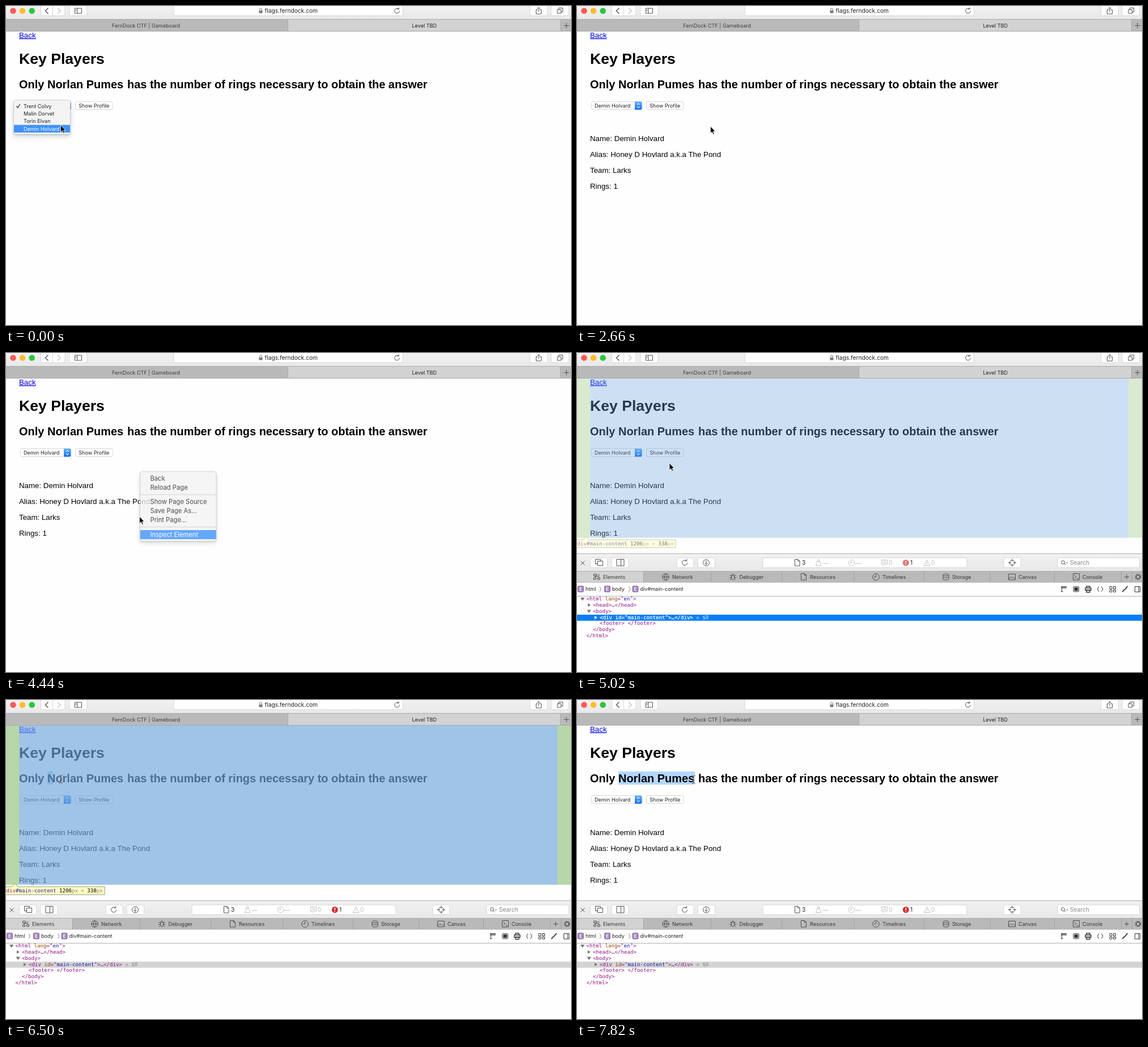
Recreate the animation shown at these times as an HTML page. Size 997 by 562 pixels, loop 8000 ms.

```html
<!DOCTYPE html>
<html lang="en">
<head>
<meta charset="utf-8">
<title>Key Players</title>
<style>
html, body { margin: 0; width: 100%; height: 100%; overflow: hidden; background: #fff; }
svg { display: block; }
text { white-space: pre; }
.ui { font: 9.1px Inter, "Open Sans", sans-serif; fill: #222; }
.big { font-size: 11.2px; }
.url { font-size: 10.2px; }
.mid { text-anchor: middle; }
.page { font: 13.3px "Liberation Sans", Arial, sans-serif; }
.h1 { font-size: 26.6px; font-weight: bold; }
.h2 { font-size: 19.95px; font-weight: bold; }
.link { fill: #00e; text-decoration: underline; }
.code { font: 9.13px "DejaVu Sans Mono", monospace; fill: #8f128a; }
.attr { fill: #994500; }
.val { fill: #1a1aa6; }
.dim { fill: #888; }
.btn { fill: #fff; stroke: #cfcfcf; stroke-width: .8; }
.ic { fill: none; stroke: #505050; stroke-width: 1; }
.pale { stroke: #c2c2c2; }
.faint { fill: #bdbdbd; }
.shadow { filter: drop-shadow(0 1px 1.5px rgba(0,0,0,.16)) drop-shadow(0 4px 4px rgba(0,0,0,.13)); }
.hit { fill: #3f92fc; visibility: hidden; }
.on .hit { visibility: visible; }
.on text { fill: #fff; }
#row rect { fill: #d4d4d4; }
#row.focus rect { fill: #087ef8; }
#row.focus text, #row.focus tspan { fill: #fff; stroke: #fff; stroke-width: .25; }
#row.focus .dim { fill: #d5e8ff; stroke: none; }
#row.focus path { fill: #fff; }
</style>
</head>
<body>
<svg width="997" height="562" viewBox="0 0 997 562">
<defs>
  <linearGradient id="bar" x2="0" y2="1"><stop stop-color="#f2f1f2"/><stop offset="1" stop-color="#e9e8e9"/></linearGradient>
  <linearGradient id="cap" x2="0" y2="1"><stop stop-color="#6ab2fa"/><stop offset="1" stop-color="#0f6dfb"/></linearGradient>
</defs>
<rect width="997" height="562" fill="#fefefe"/>

<g class="page">
  <text class="link" x="23" y="55.9">Back</text>
  <text class="h1" x="23" y="101.5">Key Players</text>
  <rect id="sel" x="73" y="126" height="23" width="0" fill="#b3d7fe"/>
  <g class="h2">
    <text x="23" y="144.6">Only</text>
    <text x="73" y="144.6">Norlan Pumes</text>
    <text x="214" y="144.6">has the number of rings necessary to obtain the answer</text>
  </g>
  <g id="profile">
    <text x="23" y="237.5">Name: Demin Holvard</text>
    <text x="23" y="265.7">Alias: Honey D Hovlard a.k.a The Pond</text>
    <text x="23" y="293.9">Team: Larks</text>
    <text x="23" y="322.1">Rings: 1</text>
  </g>
</g>

<g class="ui">
  <rect class="btn" x="25.5" y="168.5" width="89" height="14" rx="2.5"/>
  <path d="M102 168.3h10a2.5 2.5 0 0 1 2.5 2.5v9.4a2.5 2.5 0 0 1-2.5 2.5h-10z" fill="url(#cap)"/>
  <path d="M106 174l2.3-2.5 2.3 2.5M106 177l2.3 2.5 2.3-2.5" fill="none" stroke="#fff" stroke-width="1.1"/>
  <text x="31" y="178.8">Demin Holvard</text>
  <rect class="btn" x="122.5" y="168.5" width="65.5" height="14" rx="2.5"/>
  <text class="mid" x="155.3" y="178.8">Show Profile</text>
</g>

<g id="overlay">
  <rect x="23" y="45" width="950" height="280.5" fill="rgba(111,168,220,.66)"/>
  <path d="M0 45h23v280.5H0zM973 45h24v280.5h-24z" fill="rgba(147,196,125,.66)"/>
  <path d="M-1 329H10l6-5.5 6 5.5H174V343H-1z" fill="#ffffc2" stroke="#8c8c7c" stroke-width=".9"/>
  <text class="code" x=".5" y="339.3">div<tspan class="val">#main-content</tspan> <tspan fill="#000">1206</tspan><tspan class="dim">px × </tspan><tspan fill="#000">338</tspan><tspan class="dim">px</tspan></text>
</g>

<g id="chrome">
  <rect width="997" height="24" fill="url(#bar)"/>
  <rect y="23" width="997" height="21.5" fill="#bab9ba"/>
  <rect x="498" y="23.5" width="480.5" height="21" fill="#d3d2d3"/>
  <path d="M0 23.5H997M0 44.5H997M497.5 24v20M978.5 24v20" stroke="#a9a9a9" fill="none"/>
  <circle cx="12.5" cy="8.5" r="5.3" fill="#fc5b57"/>
  <circle cx="29" cy="8.5" r="5.3" fill="#fdbd2e"/>
  <circle cx="45.7" cy="8.5" r="5.3" fill="#29c740"/>
  <g class="btn">
    <rect x="61.5" y="-4" width="42.5" height="21" rx="3"/>
    <path d="M82.5 0v17"/>
    <rect x="112" y="-4" width="31" height="21" rx="3"/>
    <rect x="296" y="-4" width="404.5" height="21" rx="3"/>
    <rect x="924.5" y="-4" width="31" height="21" rx="3"/>
    <rect x="962" y="-4" width="31" height="21" rx="3"/>
  </g>
  <rect id="progress" x="296" y="16" height="2" width="0" fill="#2a8bf6"/>
  <g class="ic">
    <path d="M74.5 3.5l-5 5 5 5" stroke-width="1.4"/>
    <path class="pale" d="M91 3.5l5 5-5 5" stroke-width="1.4"/>
    <path d="M121.5 4h12v9h-12zM126 4v9M123 6.5h1.5M123 8.5h1.5"/>
    <path d="M447.5 8v-2a2 2 0 0 1 4 0v2" stroke="#777"/>
    <rect x="446.5" y="8" width="6" height="4.5" fill="#777" stroke="none"/>
    <path id="reload" d="M694.3 8.5a4.3 4.3 0 1 1-1.6-3.3M693.2 2.5v3h-3"/>
    <path id="stop" d="M686.5 5l7 7M693.5 5l-7 7"/>
    <path id="share" d="M938 6.5h-2.5v7.5h9v-7.5H942M940 10.5V2.5M937.5 5L940 2.5l2.5 2.5"/>
    <path d="M973 6.5h6.5v6.5H973zM975.5 6.5v-3h7v7h-3"/>
    <path d="M984.5 34.5h9M989 30v9"/>
  </g>
  <text class="ui url" x="456.5" y="12.3">flags.ferndock.com</text>
  <text class="ui mid" x="247" y="37.5" fill-opacity=".8">FernDock CTF | Gameboard</text>
  <text class="ui mid" x="738.3" y="37.5">Level TBD</text>
</g>

<g id="dev">
  <rect y="353" width="997" height="209" fill="#fefefe"/>
  <rect y="353" width="997" height="31" fill="url(#bar)"/>
  <rect y="384" width="997" height="20" fill="#bab9ba"/>
  <rect y="384.5" width="117" height="19.5" fill="#d3d2d3"/>
  <path d="M0 353.5H997M0 384.5H997M0 404H997M0 428.5H997" stroke="#b0b0b0"/>
  <path d="M117.5 385v19M236.5 385v19M361.5 385v19M489 385v19M612.5 385v19M729 385v19M842.5 385v19M960.5 385v19M979.5 385v19" stroke="#a2a2a2"/>
  <g class="btn">
    <rect x="23.5" y="361" width="30" height="17" rx="2.5"/>
    <rect x="61" y="361" width="30" height="17" rx="2.5"/>
    <rect x="176" y="361" width="30" height="17" rx="2.5"/>
    <rect x="213" y="361" width="30.5" height="17" rx="2.5"/>
    <rect x="328" y="361" width="360" height="17" rx="2.5"/>
    <rect x="753" y="361" width="30" height="17" rx="2.5"/>
    <rect x="848" y="361" width="145" height="17" rx="2.5"/>
  </g>
  <g class="ic">
    <path d="M6.5 366.5l7 7M13.5 366.5l-7 7"/>
    <path d="M36 371.5h-3.500v-8h9v3M36.500 366.500h9v8h-9z"/>
    <path d="M70 363.5h13v11.5H70zM77.5 363.5v11.5"/>
    <path d="M194.5 369.5a4.5 4.5 0 1 1-1.7-3.5M193.8 363v3.3h-3.3"/>
    <circle cx="228" cy="369.5" r="5.5"/><path d="M228 366v6.5M225.5 370l2.5 2.5 2.5-2.5"/>
    <path d="M384.5 363.5h5.5l3 3v8.5h-8.5zM390 363.5v3h3"/>
    <g class="pale">
      <path d="M423.5 367.5h5l2 7h-9z"/><circle cx="426" cy="365.5" r="1.8"/>
      <circle cx="484.5" cy="369.5" r="5.3"/><path d="M484.5 366v3.5h-3M433.5 370.5h10M491 370.5h10"/>
      <path d="M537.5 364.5h10v7.5h-5l-2.5 2.5v-2.5h-2.5zM539.5 367h6M539.5 369.5h6"/>
      <path d="M617.5 364.5l5.5 10H612zM617.5 368v3M617.5 372v1.2"/>
    </g>
    <circle cx="768" cy="369.5" r="4.5"/><path d="M768 362.5v5M768 371.5v5M761 369.5h5M770 369.5h5"/>
    <circle cx="857.5" cy="368.8" r="3"/><path d="M859.8 371l2.5 2.5M863 369l1.5 1.5 1.5-1.5"/>
  </g>
  <g id="error">
    <circle cx="580.3" cy="369.5" r="5.5" fill="#d03434"/>
    <path d="M580.3 366v4M580.3 371.5v1.5" stroke="#fff" stroke-width="1.4"/>
  </g>
  <g class="ui url">
    <text x="397" y="373.2">3</text><text x="588" y="373.2">1</text>
    <text class="faint" x="550" y="373.2">0</text><text class="faint" x="625" y="373.2">0</text>
    <text x="870" y="373.2" fill-opacity=".55">Search</text>
  </g>
  <g id="tabs" class="ui" fill-opacity=".85"></g>
  <g class="ic">
    <path d="M29.5 389.5h5v3h-5zM29.5 396h4v3h-4zM36.5 396h4v3h-4zM32 393v3M38.5 396v-2.5H32M36 391h4"/>
    <circle cx="156.5" cy="394.5" r="5.8"/><path d="M151 394.5h11M156.5 389c-3 3-3 8 0 11c3-3 3-8 0-11"/>
    <path d="M272.5 392h5v5.5l-2.5 2-2.5-2zM273 391.5l1-2h2l1 2M269.5 391l3 2M280.5 391l-3 2M269 395.5h3.5M281 395.5h-3.5M270 399.5l2.5-2M280 399.5l-2.5-2"/>
    <path d="M395.5 388.5h6l3 3v8.5h-9zM401.5 388.5v3h3"/>
    <circle cx="527.5" cy="394.5" r="5.8"/><path d="M527.5 390.5v4h-3.5"/>
    <ellipse cx="651" cy="391" rx="5" ry="1.8"/><path d="M646 391v7.5c2 2 8 2 10 0V391M646 394.5c2 2 8 2 10 0"/>
    <path d="M761.5 389.5h12v10h-12zM762 398l3.5-4 3 3 2-2 3 3"/>
    <path d="M875.5 388.5h11v11.5h-11zM877.5 391l3 3-3 3M881.5 397.5h3.5"/>
    <path d="M966 394.5h8M970 390.5v8"/>
    <circle cx="990" cy="394.5" r="4.2" stroke-width="2.2" stroke-dasharray="2 1.3"/><circle cx="990" cy="394.5" r="3"/>
    <path d="M40 411.5l2.5 4.5-2.5 4.5M91.5 411.5l2.5 4.5-2.5 4.5" stroke="#888"/>
    <g stroke="#333">
      <path d="M854 411.5h10M855.5 411v10M854 414h10M857.5 411v3M860 411v3M862.5 411v3M854 420.5h3.5"/>
      <rect x="876" y="411.5" width="9.5" height="9" rx="1.5"/><rect x="878" y="413.5" width="5.5" height="5" fill="#333"/>
      <path d="M897 414h10v4h-10zM899 414v-3h6v3M899 417.5h6v4h-6z" stroke-width="1.4"/>
      <path d="M921 411.5l-2.5 4.5 2.5 4.5M925.5 411.5l2.5 4.5-2.5 4.5"/>
      <path d="M940 411.5h4v4h-4zM946.5 411.5h4v4h-4zM940 417.5h4v3.5h-4zM946.5 417.5h4v3.5h-4z"/>
      <path d="M971.5 411l-5.5 6.5M965.5 417l-3 4" stroke-width="1.9"/>
      <path d="M984.5 411.5h9v9.5h-9zM991 411.5v9.5"/>
    </g>
  </g>
  <g id="crumbs" class="ui"></g>
  <g class="code">
    <path d="M6 431h7.5l-3.7 5.5zM19 441l5 3-5 3zM17.5 452.5h7.5l-3.7 5.5z" fill="#777"/>
    <text x="16.5" y="436">&lt;html <tspan class="attr">lang</tspan>="<tspan class="val">en</tspan>"&gt;</text>
    <text x="28" y="446.9">&lt;head&gt;<tspan fill="#333">…</tspan>&lt;/head&gt;</text>
    <text x="28" y="457.7">&lt;body&gt;</text>
    <g id="row">
      <rect y="461" width="997" height="10.7"/>
      <path d="M31 463l5 3-5 3z" fill="#777"/>
      <text x="40" y="468.6">&lt;div <tspan class="attr">id</tspan>="<tspan class="val">main-content</tspan>"&gt;<tspan fill="#333">…</tspan>&lt;/div&gt;<tspan class="dim"> = $0</tspan></text>
    </g>
    <text x="40" y="479.4">&lt;footer&gt; &lt;/footer&gt;</text>
    <text x="28" y="490.2">&lt;/body&gt;</text>
    <text x="16.5" y="501">&lt;/html&gt;</text>
  </g>
</g>

<g id="popup" class="ui">
  <rect class="shadow" x="13.5" y="166" width="100" height="60" rx="4" fill="#f4f4f4" stroke="#c4c4c4" stroke-width=".6"/>
  <path d="M18.5 176.5l2.3 2.8 4-6.3" fill="none" stroke="#222" stroke-width="1.2"/>
</g>
<g id="context" class="ui big">
  <rect class="shadow" x="236.5" y="209" width="134.5" height="122.5" rx="4" fill="#f3f3f3" stroke="#bbb" stroke-width=".6"/>
  <path d="M237 249.5h134M237 306.5h134" stroke="#d6d6d6" stroke-width="1.5"/>
</g>

<path id="arrow" d="M0 0V12.2L2.8 9.7L4.8 14.2L6.8 13.3L4.9 8.9H8.6Z" fill="#000" stroke="#fff" stroke-width=".8"/>
<g id="beam" fill="none">
  <path d="M-3-7Q0-7 0-5Q0-7 3-7M0-5V5M-3 7Q0 7 0 5Q0 7 3 7M-1.5 2h3" stroke="#fff" stroke-width="2.2" opacity=".7"/>
  <path d="M-3-7Q0-7 0-5Q0-7 3-7M0-5V5M-3 7Q0 7 0 5Q0 7 3 7M-1.5 2h3" stroke="#222"/>
</g>
</svg>
<script>
const $ = id => document.getElementById(id);
const add = (id, html) => $(id).insertAdjacentHTML('beforeend', html);
const label = (x, y, s) => `<text x="${x}" y="${y}">${s}</text>`;
const item = (x, y, w, h, tx, base, s) =>
  `<g class="item"><rect class="hit" x="${x}" y="${y}" width="${w}" height="${h}"/>${label(tx, y + base, s)}</g>`;

[['Elements', 46], ['Network', 168], ['Debugger', 286.5], ['Resources', 411], ['Timelines', 539],
 ['Storage', 662], ['Canvas', 779], ['Console', 892]].forEach(([s, x]) => add('tabs', label(x, 398, s)));

[['html', 1.5], ['body', 48.5], ['div#main-content', 98]].forEach(([s, x]) => add('crumbs',
  `<rect x="${x}" y="410.5" width="10" height="10.5" rx="1.5" fill="#a585bd" stroke="#7d5a99" stroke-width=".8"/>
   <path d="M${x + 7} 413h-3.5v5.5h3.5M${x + 3.5} 415.7h3" fill="none" stroke="#fff"/>` + label(x + 13.5, 419.2, s)));

['Trent Colvy', 'Malin Dorvet', 'Torin Elvan', 'Demin Holvard'].forEach((s, i) =>
  add('popup', item(14, 169.6 + i * 13.3, 99, 13.4, 31, 10, s)));
$('popup').lastElementChild.classList.add('on');

[['Back', 213], ['Reload Page', 229], ['Show Page Source', 254], ['Save Page As...', 270],
 ['Print Page...', 286], ['Inspect Element', 312]].forEach(([s, y]) =>
  add('context', item(236.8, y, 134, 16, 254.5, 11.6, s)));
const entries = [...$('context').querySelectorAll('.item')];

// Bursts of steady steps with rests between: [start, steps]
const STEP = 147;
const bursts = [[0, 1], [300, 8], [1480, 8], [2660, 1], [3410, 8], [4580, 8], [5760, 3], [6350, 8], [7530, 3]];
function snap(t) {
  const [start, n] = bursts.filter(b => b[0] <= t).pop();
  return start + STEP * Math.min(n - 1, Math.floor((t - start + 8) / STEP));
}

// Linear track of [time, ...values]
function at(track, t) {
  const i = track.findIndex(k => k[0] > t);
  if (i === 0) return track[0].slice(1);
  if (i < 0) return track[track.length - 1].slice(1);
  const a = track[i - 1], b = track[i], p = (t - a[0]) / (b[0] - a[0]);
  return a.slice(1).map((v, j) => v + (b[j + 1] - v) * p);
}

const pointer = [[300, 96.5, 210], [889, 130, 182], [1183, 130, 180], [1480, 128, 180], [2660, 235.5, 212],
  [3557, 235.5, 212], [4145, 247, 313], [4292, 246, 312], [4439, 235.5, 288], [5021, 163, 194], [5168, 128, 184],
  [5609, 76, 150], [5760, 73.5, 141], [6350, 73.5, 140], [6938, 166.5, 138], [7379, 196, 140], [7824, 205.5, 140]];
const selection = [[6350, 73], [6497, 83], [6938, 157], [7379, 197], [7824, 208]];
const glow = [[4857, 0], [5168, 1], [6791, 1], [7379, 0]];
const loadBar = [[1036, 10], [1330, 150], [2510, 334]];
const errorTint = [[5168, .68], [5609, 1]];
const hover = [[3557, 0], [3704, 1], [3851, 2], [3998, 4], [4145, 5]];

const show = (id, on) => { $(id).style.display = on ? '' : 'none'; };

function draw(now) {
  const t = snap(now % 8000);
  const loading = t >= 1036 && t < 2660;
  const overText = t >= 5760;
  show('popup', t < 447);
  show('profile', t >= 2660);
  show('context', t >= 3410 && t < 4580);
  show('dev', t >= 4727);
  show('progress', loading);
  show('stop', loading);
  show('reload', !loading);
  show('arrow', !overText);
  show('beam', overText);
  $('share').style.opacity = loading ? .35 : 1;
  $('progress').setAttribute('width', at(loadBar, t)[0]);
  $('context').style.opacity = t >= 4439 ? .8 : .98;
  const hot = hover.filter(h => h[0] <= t).pop();
  entries.forEach((e, i) => e.classList.toggle('on', !!hot && hot[1] === i));
  $('row').classList.toggle('focus', t < 6054);
  $('overlay').style.opacity = at(glow, t)[0];
  $('error').style.opacity = at(errorTint, t)[0];
  $('sel').setAttribute('width', at(selection, t)[0] - 73);
  const move = `translate(${at(pointer, t)})`;
  $('arrow').setAttribute('transform', move);
  $('beam').setAttribute('transform', move);
}
const begin = performance.now();
function tick() {
  draw(performance.now() - begin);
  requestAnimationFrame(tick);
}
tick();
</script>
</body>
</html>
```
